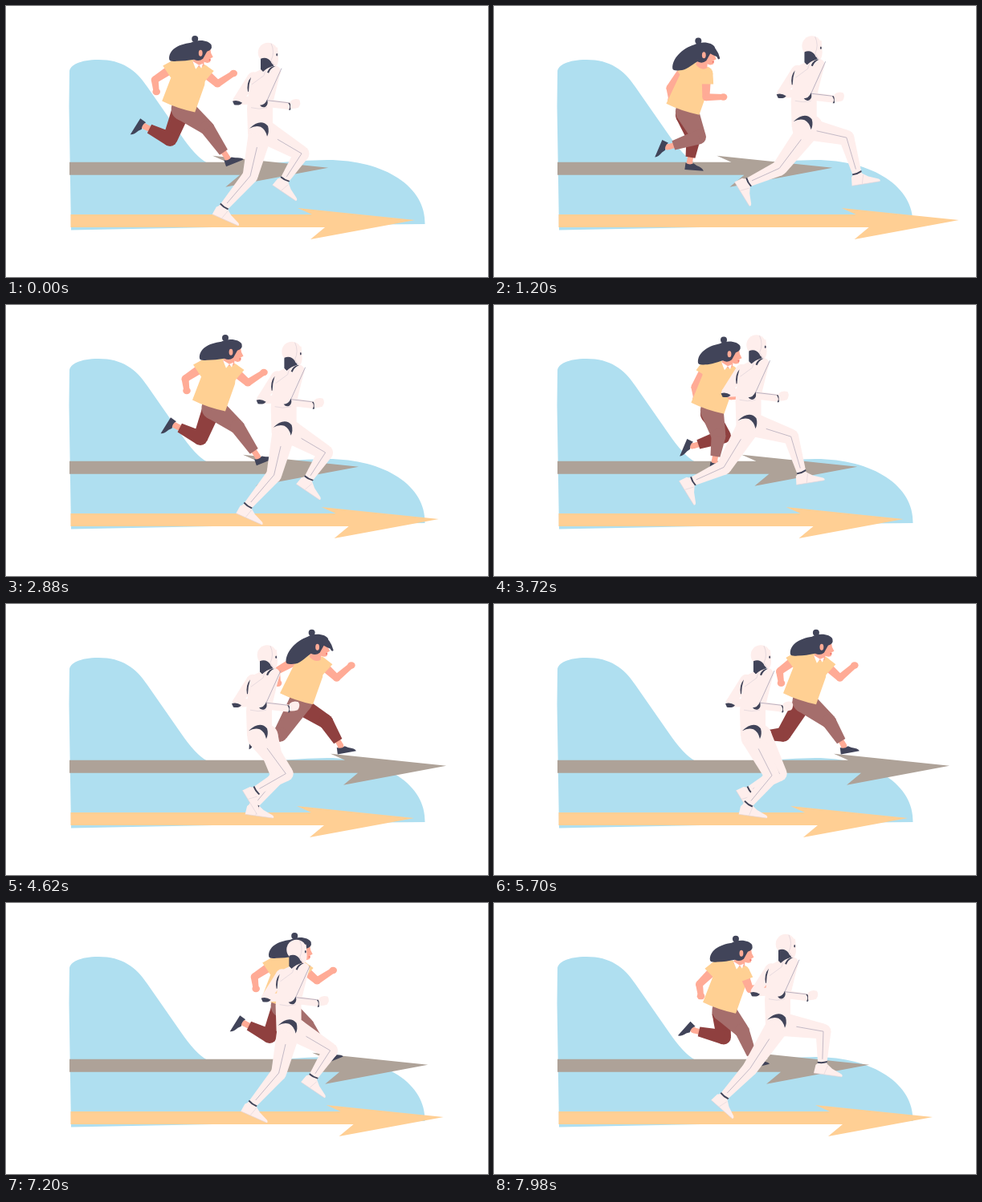
Animation, 600 px wide and 338 px high, one loop 8000 ms. Source, as an HTML page with a canvas:

```html
<!DOCTYPE html>
<html lang="en">
<head>
<meta charset="utf-8">
<title>Race</title>
<style>
  html, body { margin: 0; width: 100%; height: 100%; overflow: hidden; background: #fff; }
  canvas { display: block; width: 100vw; height: 100vh; }
</style>
</head>
<body>
<canvas id="stage" width="600" height="338"></canvas>
<script>
const ctx = document.getElementById('stage').getContext('2d');
const LOOP = 8000, TICK = 60, STRIDE = 720;
const BLUE = '#afdff0', GRAY = '#aea298', GOLD = '#ffcf94', SKIN = '#ffab96', NAVY = '#414459',
      LIGHT = '#a56e6c', DARK = '#8f403f', SHIRT = '#ffd093', PALE = '#feeeec', LINE = '#a9a3b5';

// Arrow tips: [ms, x], eased between keys.
const grayKeys = [[-120, 400], [2400, 438], [3370, 438], [5040, 566], [6280, 566], [8524, 450]];
const goldKeys = [[-120, 507], [1500, 584], [3940, 507], [4990, 507], [7510, 545], [9000, 545]];

function tween(keys, t) {
  const i = keys.findIndex(k => k[0] > t);
  const [t0, a] = keys[i - 1], [t1, b] = keys[i];
  return a + (b - a) * (1 - Math.cos(Math.PI * (t - t0) / (t1 - t0))) / 2;
}

// Periodic motion: a mean plus [cosine, sine] amplitudes of successive harmonics.
const wave = (angle, mean, ...harmonics) => harmonics.reduce((sum, [c, s], i) =>
  sum + c * Math.cos((i + 1) * angle) + s * Math.sin((i + 1) * angle), mean);

// Leg joints at a stride angle; the other leg runs half a turn later.
const womanLeg = a => ({
  knee: [wave(a, 227, [23, -17], [0, 5]), wave(a, 159, [-7, 4], [0, 5])],
  ankle: [wave(a, 214, [51, -14], [10, 1]), wave(a, 177.5, [14, 8], [-8, 4], [5, 2])],
  tilt: wave(a, 50, [-72, -21], [0, 10])
});
const robotLeg = a => ({
  knee: [wave(a, 337, [-29, -35], [0, -10], [-3, -3]), wave(a, 198, [14, 14], [0, -17], [0, 4])],
  ankle: [wave(a, 313, [-36, -61], [-4, 0], [-2, 0]), wave(a, 229, [17, -4], [6, -12], [0, 8])],
  tilt: wave(a, 29, [-5, 42], [0, -5])
});

const mix = (a, b, f) => [a[0] + (b[0] - a[0]) * f, a[1] + (b[1] - a[1]) * f];

function fill(color, d) {
  ctx.fillStyle = color;
  ctx.fill(new Path2D(d));
}
function line(color, width, d) {
  ctx.strokeStyle = color;
  ctx.lineWidth = width;
  ctx.stroke(new Path2D(d));
}
function dot(color, x, y, rx, ry = rx) {
  ctx.fillStyle = color;
  ctx.beginPath();
  ctx.ellipse(x, y, rx, ry, 0, 0, 7);
  ctx.fill();
}
function at(x, y, degrees, draw) {
  ctx.save();
  ctx.translate(x, y);
  ctx.rotate(degrees * Math.PI / 180);
  draw();
  ctx.restore();
}
// Tapered limb, round at every joint but flat at its end.
function limb(color, points, widths) {
  for (let i = 0; i + 1 < points.length; i++) {
    const [x, y] = points[i], [u, v] = points[i + 1];
    const a = widths[i] / 2, b = widths[i + 1] / 2;
    const length = Math.hypot(u - x, v - y) || 1;
    const nx = (y - v) / length, ny = (u - x) / length;
    dot(color, x, y, a);
    ctx.beginPath();
    ctx.moveTo(x + nx * a, y + ny * a);
    ctx.lineTo(u + nx * b, v + ny * b);
    ctx.lineTo(u - nx * b, v - ny * b);
    ctx.lineTo(x - nx * a, y - ny * a);
    ctx.fill();
  }
}

function hills() {
  fill(BLUE, `M81 279.5L78.5 125L79 82C79 74 92 67 115 67C145 67 162 80 176 101L217 160
    Q236 188 250 195.5Q270 199 310 198.5Q350 193 400 192C472 192 523 226 521.5 272L410 273Z`);
}
function arrow(color, left, tip, y, reach) {
  fill(color, `M${left} ${y - 7}H${tip - reach + 18}L${tip - reach} ${y - 15}L${tip} ${y}
    L${tip - reach + 16} ${y + 24}L${tip - reach + 34} ${y + 9}H${left}Z`);
}

function womanLimb(color, hip, { knee, ankle, tilt }, width) {
  limb(SKIN, [knee, ankle], [8, 7]);
  at(...ankle, tilt, () => {
    dot(SKIN, 0, 1, 3.8);
    fill(NAVY, 'M-5 2Q0 5 5 2L9 4.5Q17 7 18 10.5H-5.5Z');
  });
  limb(color, [hip, knee, mix(knee, ankle, .83)], [width, 18, 12]);
}
function arm(shoulder, elbow, hand, sleeve) {
  limb(SKIN, [shoulder, elbow, hand], [12, 9, 7]);
  dot(SKIN, ...hand, 4.8, 4.2);
  limb(SHIRT, [shoulder, mix(shoulder, elbow, sleeve)], [16, 18]);
}
function womanHead(turned) {
  const drop = y => y + 12 * turned;
  fill(SKIN, 'M235 60L247 62L246 73Q239 77 232 69Z');
  fill(SKIN, 'M242 50L254 51L255 57L257.5 62L254.5 63.5L254 68Q249 71 244 66Z');
  dot('#ef6a63', 253.5, 65.5, 1.2, .8);
  dot(NAVY, 235, 39.2, 4);
  fill(NAVY, `M203 ${drop(65)}C202 ${drop(53)} 214 ${46 + 4 * turned} 230 44
    C239 39 253 41 255.5 47Q257 53 250 55L245 64Q240 68 234 65
    C226 ${66 + 5 * turned} 220 ${drop(67)} 212 ${drop(67)}Q204 ${drop(68)} 203 ${drop(65)}Z`);
  dot(SKIN, 242, 57, 2.4, 4);
  if (turned > .5) fill(NAVY, 'M248 43Q258 46 262 61Q260 64 258 59Q253 57 248 54Z');
}
function woman(stride) {
  const step = stride * 2, turned = (1 - Math.cos(stride)) / 2;
  const bob = wave(step, -1.4, [1.8, 7.1]);
  const backElbow = [wave(step, 194, [-9, 0]), wave(step, 93, [-1, 10])];
  const frontElbow = [wave(step, 254, [9, -7]), wave(step, 103, [-6, 9])];
  const frontHand = [wave(step, 274, [9, -5]), wave(step, 95, [-11, 15])];
  const left = 8 * turned;

  womanLimb(DARK, [217, 132 + bob], womanLeg(stride + Math.PI), 23);
  womanLimb(LIGHT, [220, 128 + bob], womanLeg(stride), 29);
  arm([210 + left, 75 + bob], backElbow, [backElbow[0] + 2, backElbow[1] + 15], .4 * (1 - turned));
  at(0, bob, 0, () => fill(SHIRT, `M${206 + 2 * left} 67Q224 64 240 68L249 78L247 98L235 132
    Q212 127 194 118L${207 + left / 2} 84Z`));
  arm([244, 80 + bob], frontElbow, frontHand, .45);
  at(-1.5 * turned, wave(step, .5, [1.3, 5.2]), 0, () => {
    womanHead(turned);
    if (turned < .5) fill('#fff', 'M232 67L240 72L236 77Z M240 72L245 70L243 76Z');
  });
}

function robotLimb(hip, { knee, ankle, tilt }) {
  limb(PALE, [hip, knee, ankle], [29, 19, 11]);
  at(...ankle, tilt, () => {
    dot(PALE, 0, 1, 6);
    fill(PALE, 'M-8 2L-4 -2L6 -1L13 4L25 9Q28 11 26 12.5H-9Z');
    line('#e1d4d9', .6, 'M-9 12.5H26M7 1L4 12');
  });
  const shin = Math.atan2(ankle[1] - knee[1], ankle[0] - knee[0]) * 180 / Math.PI;
  at(...ankle, shin, () => fill(NAVY, 'M-4 -6Q-2 0 -3 6L-1 6Q0 0 -2 -6Z'));
  line(LINE, .7, `M${mix(hip, knee, .3)}L${knee}L${mix(knee, ankle, .85)}`);
}
function robotBody() {
  // far arm
  limb(PALE, [[309, 90], [289, 118], [318, 118]], [15, 11, 9]);
  fill(NAVY, 'M283 119Q289 117 295 121Q292 125 285 123.5Z');
  // torso
  fill(PALE, 'M309 84Q318 79 325 77L338 75Q344 77 342 85L333 122L333 160L302 160L301 128L304 98Z');
  fill(NAVY, 'M302 107Q300 96 306 89Q303 98 303 107Z');
  fill(NAVY, 'M326 83Q329 75 337 75Q330 78 328 84Z');
  line('#ddd2d8', .7, 'M307 98L322 87L324 80M306 127Q316 130 326 127');
  // neck and head
  fill(NAVY, 'M318 64L333 67L334 75Q326 77 321 82L318 79Z');
  dot(PALE, 327, 58.5, 12.3, 12.5);
  fill(PALE, 'M328 52H339L340 66Q340 74 336 76L330 70Z');
  fill(NAVY, 'M318 66Q326 63 331 70L332 75Q325 77 321 82L318 79Z');
  line('#dccfd6', .7, 'M331 47Q336 58 331 68L336 76');
  dot(NAVY, 338.2, 61, .9, 1.7);
  // near arm
  limb(PALE, [[337, 82], [325, 121], [355, 125]], [12, 10, 9]);
  line(LINE, .8, 'M344 78L326 118L352 121');
  fill(NAVY, 'M317 124Q323 124 326 117Q328 123 324 126Q320 128 317 124Z');
  fill(NAVY, 'M352 121Q356 125 353 130L355 130Q357 125 354 121Z');
  fill(PALE, 'M355 119Q359 115 366 117Q369 122 365 127Q359 129 355 128Z');
}
function robot(stride) {
  const bob = wave(stride * 2, -1.8, [1.5, -7.2]);
  robotLimb([326, 159 + bob], robotLeg(stride + Math.PI));
  at(0, bob, 0, robotBody);
  robotLimb([317, 161 + bob], robotLeg(stride));
  at(0, bob, 0, () =>
    fill(NAVY, 'M304 153Q318 140 327 150Q329 157 326 163Q324 154 318 151Q311 149 304 153Z'));
}

function draw(now) {
  const t = Math.floor(now % LOOP / TICK) * TICK;
  const stride = t / STRIDE * 2 * Math.PI;
  const gray = tween(grayKeys, t), gold = tween(goldKeys, t);
  ctx.fillStyle = '#fff';
  ctx.fillRect(0, 0, 600, 338);
  hills();
  arrow(GRAY, 79, gray + 1, 201.7, 144);
  at(gray - 400, 0, 0, () => woman(stride));
  arrow(GOLD, 80.5, gold + 1, 267, 146);
  at(gold - 509, 0, 0, () => robot(stride));
  requestAnimationFrame(draw);
}
requestAnimationFrame(draw);
</script>
</body>
</html>
```
